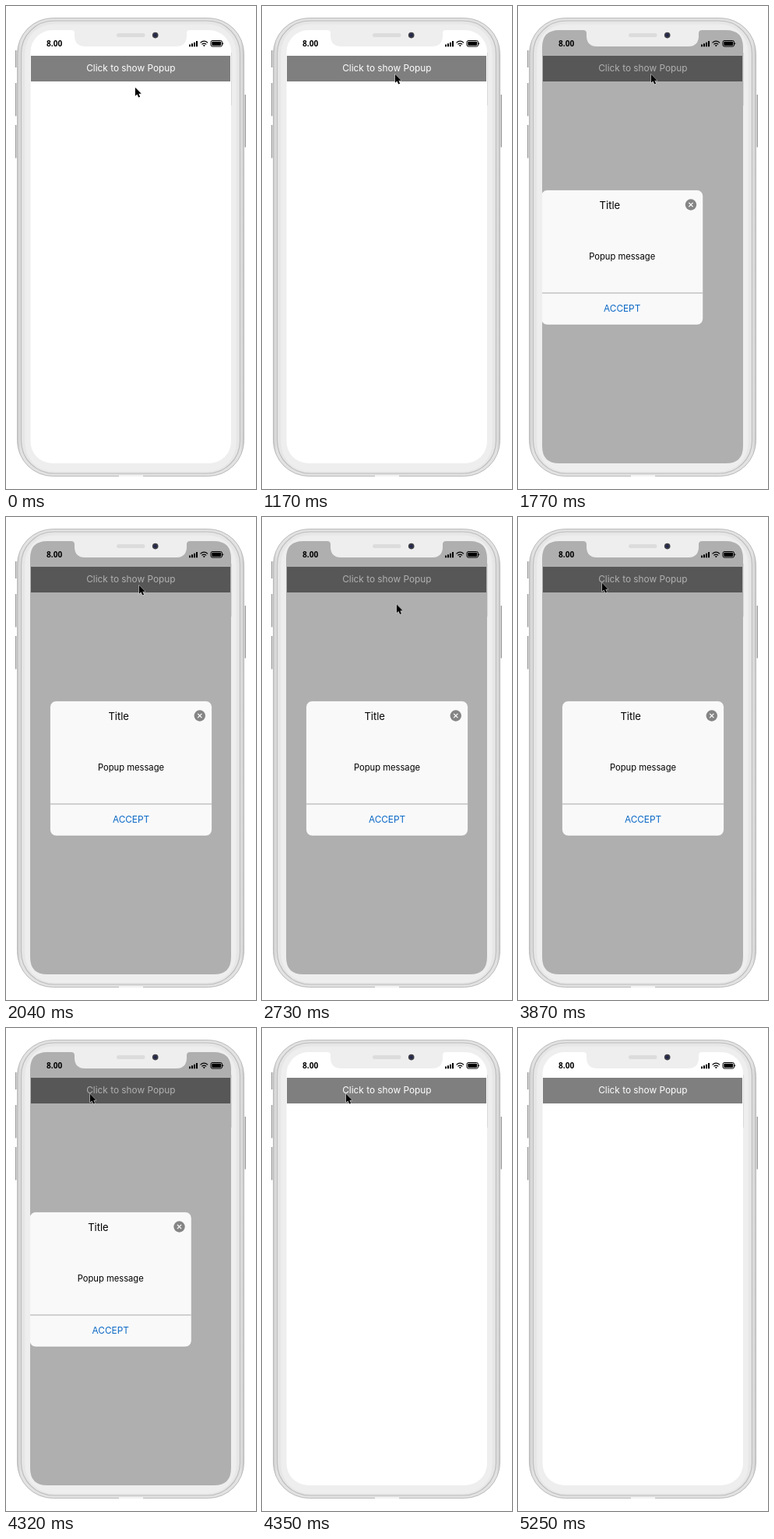
Animation of 321 by 621 pixels, one loop 5280 ms. Source, as an HTML page:

```html
<!DOCTYPE html>
<html lang="en">
<head>
<meta charset="utf-8">
<title>Popup demo</title>
<style>
html, body { margin: 0; width: 100%; height: 100%; overflow: hidden; background: #fff; }
svg { display: block; width: 321px; height: 621px; }
text { font-family: Inter, Roboto, sans-serif; text-anchor: middle; }
.overlay, .popup, .cursor { animation: 5280ms linear infinite; }
.overlay { animation-name: dim; }
.popup { animation-name: slide; }
.cursor { animation-name: point; }

@keyframes dim {
  0%, 33.522% { visibility: hidden; }
  33.523%, 82.385% { visibility: visible; }
  82.386%, 100% { visibility: hidden; }
}

@keyframes slide {
  0%, 33.522% { visibility: hidden; transform: translateX(-27px); }
  33.523% { visibility: visible; transform: translateX(-27px); animation-timing-function: ease-out; }
  38.636% { transform: none; }
  78.977% { transform: none; animation-timing-function: ease-in; }
  81.818% { transform: translateX(-26px); }
  82.385% { visibility: visible; transform: translateX(-34px); }
  82.386%, 100% { visibility: hidden; transform: translateX(-34px); }
}

@keyframes point {
  0%, .3% { transform: translate(165px, 104px); animation-timing-function: ease-in-out; }
  5.68%, 16.5% { transform: translate(169px, 86px); }
  19.3% { transform: translate(175px, 82px); }
  22.159%, 50% { transform: translate(170px, 87px); animation-timing-function: ease-in-out; }
  58.5%, 59.089% { transform: translate(193px, 380px); }
  59.09%, 68.181% { transform: translate(106px, 80px); }
  68.182% { transform: translate(193px, 380px); animation-timing-function: ease-in-out; }
  73.295%, 88.067% { transform: translate(107px, 84px); }
  88.068% { transform: translate(110px, 70px); }
  89.205%, 98.863% { transform: translate(108px, 79px); }
  98.864%, 99.43% { transform: translate(263px, 82px); visibility: visible; }
  99.431%, 100% { transform: translate(263px, 82px); visibility: hidden; }
}
</style>
</head>
<body>
<svg viewBox="0 0 321 621">
  <defs>
    <linearGradient id="rim">
      <stop offset="0" stop-color="#c9c9c9"/>
      <stop offset=".015" stop-color="#e2e2e2"/>
      <stop offset=".985" stop-color="#e2e2e2"/>
      <stop offset="1" stop-color="#c9c9c9"/>
    </linearGradient>
    <path id="glass" d="M31 53Q31 31 53 31H84Q88 31 88 35V38Q88 52 102 52H218Q232 52 232 38V35Q232 31 236 31H267Q289 31 289 53V566Q289 588 267 588H53Q31 588 31 566Z"/>
    <clipPath id="screen"><use href="#glass"/></clipPath>
  </defs>

  <!-- Phone body -->
  <g fill="#dcdcdc">
    <path id="keys" d="M12 57h4v22h-4zM12 99h4v42.5h-4zM12 153h4v42.5h-4zM304 114h4v67.5h-4z"/>
    <path d="M12.5 57V79M12.5 99V141.5M12.5 153V195.5M307.5 114V181.5" stroke="#979797"/>
  </g>
  <rect x="14.5" y="15.5" width="291" height="589" rx="46" fill="url(#rim)" stroke="#bababa"/>
  <rect x="19.5" y="19" width="281" height="582" rx="42" fill="#e6e6e6" stroke="#bdbdbd" stroke-width="1.2"/>
  <rect x="24" y="23" width="272" height="576" rx="37" fill="#eee" stroke="#e8e8e8"/>
  <rect x="145" y="603" width="31" height="2" fill="#f3f3f3"/>

  <!-- Screen -->
  <g clip-path="url(#screen)">
    <rect x="31.5" y="31" width="257.5" height="557" rx="28" fill="#fff"/>
    <rect class="overlay" x="31" y="31" width="258" height="557" fill="#fff"/>
    <rect x="32" y="64" width="256" height="33" fill="#7f7f7f"/>
    <text x="160.4" y="84" font-size="11.85" fill="#fff">Click to show Popup</text>
    <rect class="overlay" x="31" y="31" width="258" height="557" fill="#000" fill-opacity=".315"/>
    <g class="popup">
      <rect x="56.5" y="236.5" width="208" height="173.5" rx="8" fill="#f9f9f9" stroke="#a0a0a0" stroke-width=".6"/>
      <path d="M57 369H264" stroke="#a8a8a8"/>
      <text x="144.7" y="260.5" font-size="13">Title</text>
      <circle cx="248.8" cy="255.5" r="7.2" fill="#858585"/>
      <path d="M246.2 252.9l5.2 5.2m0-5.2l-5.2 5.2" stroke="#fff" stroke-width="1.3"/>
      <text x="160.5" y="326" font-size="11.2">Popup message</text>
      <text x="160.5" y="393.3" font-size="11.8" fill="#0b68c6">ACCEPT</text>
    </g>
  </g>
  <path d="M289.5 60V128" stroke="#d9d9d9"/>

  <!-- Speaker and camera -->
  <rect x="142" y="35" width="36.5" height="5" rx="2.5" fill="#dcdcdc"/>
  <circle cx="191.7" cy="37.6" r="3.8" fill="#3b3c45"/>
  <circle cx="191.7" cy="37.6" r="1.8" fill="#20244f"/>

  <!-- Status bar -->
  <text x="62.2" y="52.2" font-size="10.1" font-weight="700" style="font-family:'Open Sans','Noto Sans',sans-serif">8.00</text>
  <path d="M235 49.5h2v2.7h-2zM238 48.3h2v3.9h-2zM241 46.8h2v5.4h-2zM244 45h2v7.2h-2z"/>
  <g fill="none" stroke="#000" stroke-width="1.2">
    <path d="M249.5 47.4Q254.3 42.9 259.1 47.4M251.4 49.4Q254.3 46.8 257.2 49.4"/>
    <rect x="263" y="44.5" width="14.5" height="7.5" rx="2" stroke-width="1"/>
  </g>
  <path d="M252.8 50.6Q254.3 49.4 255.8 50.6L254.3 52.2Z"/>
  <rect x="264.3" y="45.8" width="11.9" height="4.9" rx=".8"/>
  <path d="M278.4 47v2.5q1-.3 1-1.25t-1-1.25z"/>

  <path class="cursor" d="M.9 .7V11.8L3.4 9.5 5.2 13.6 7.1 12.8 5.4 8.8H8.8Z" stroke="#fff" stroke-width=".9" stroke-linejoin="round" paint-order="stroke"/>
</svg>
</body>
</html>
```
